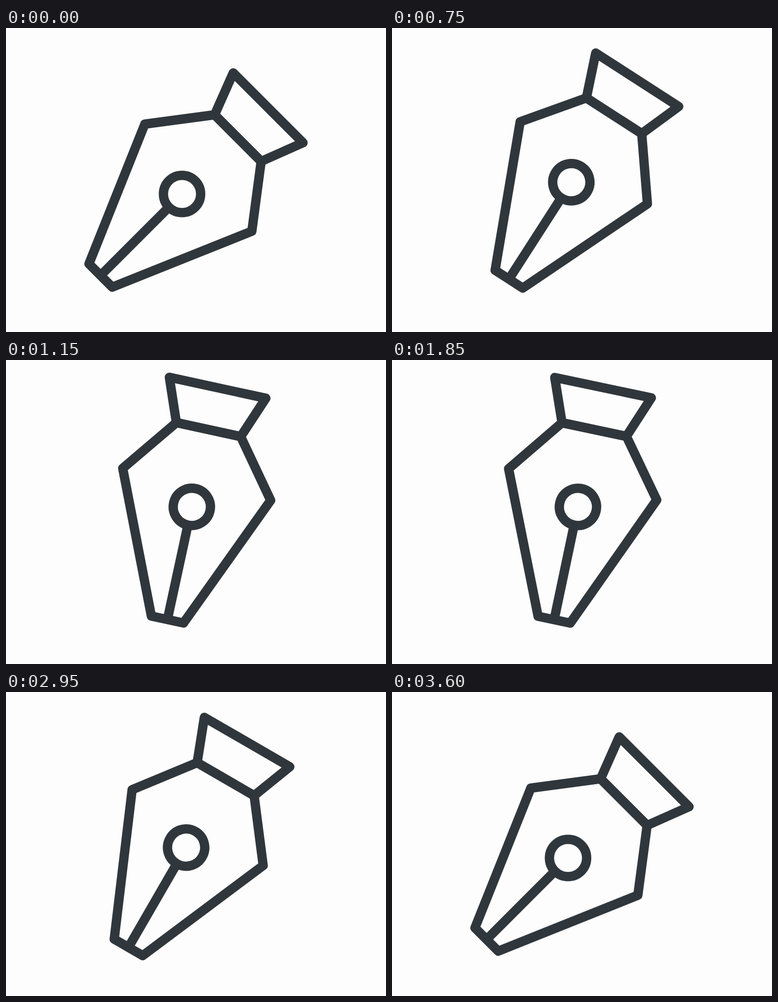
Recreate the animation shown at these times as an HTML page. Size 837x669 px, loop 3650 ms.

```html
<!DOCTYPE html>
<html lang="en">
<head>
<meta charset="utf-8">
<title>Pen nib</title>
<style>
  html, body { margin: 0; width: 100%; height: 100%; overflow: hidden; background: #fdfdfd; }
  svg { display: block; width: 100vw; height: 100vh; }
</style>
</head>
<body>
<svg viewBox="0 0 837 669">
  <!-- Drawn on a grid where the stroke is one unit wide -->
  <g id="pen" fill="none" stroke="#30373c" stroke-linejoin="round">
    <path d="M2-7 4-11.5 11.5-4 7-2Z"/>
    <path d="M2-7 7-2 6 5.5-9 11.5-11.5 9-5.5-6Z"/>
    <path d="M-10.25 10.25-2.9 2.9"/>
    <circle cx="-1.5" cy="1.5" r="2"/>
  </g>
</svg>
<script>
  const LOOP = 3650, UNIT = 20.5, TURN = -33.1, LIFT = -53.8;
  const pen = document.getElementById('pen');

  const ease = (t, start, end) => {
    const u = Math.min(1, Math.max(0, (t - start) / (end - start)));
    return u * u * (3 - 2 * u);
  };

  function draw(now) {
    const t = now % LOOP;
    const angle = TURN * (ease(t, 440, 1195) - ease(t, 2560, 3295));
    const y = 334.5 + LIFT * (ease(t, 450, 988) - ease(t, 2575, 3385));
    pen.setAttribute('transform', `translate(418.5 ${y}) rotate(${angle}) scale(${UNIT})`);
  }

  const start = performance.now();
  function tick() {
    draw(performance.now() - start);
    requestAnimationFrame(tick);
  }
  tick();
</script>
</body>
</html>
```
